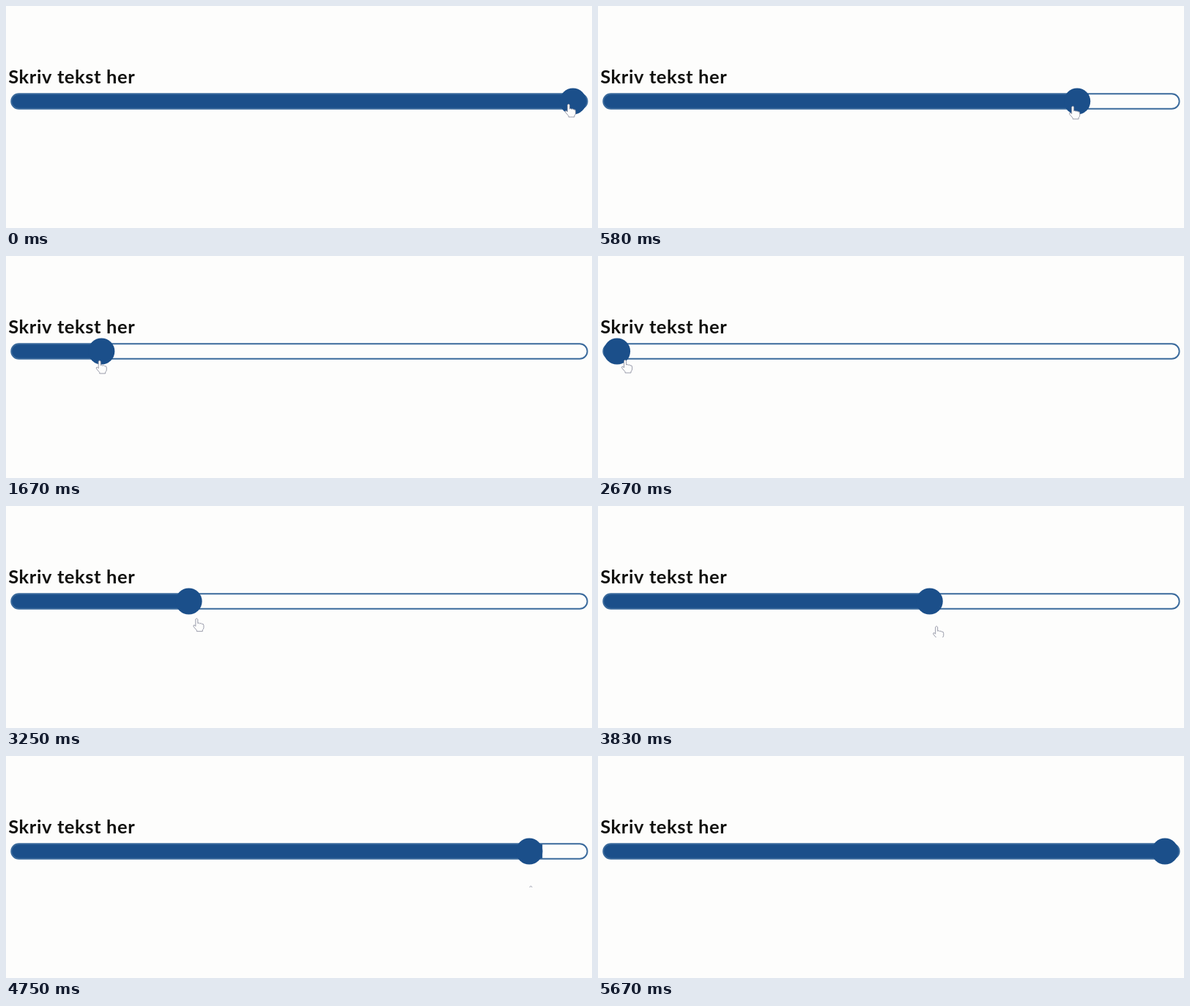
Write an HTML page with a canvas that moves like this. It is 800 by 304 pixels and loops after 6580 ms.

```html
<!DOCTYPE html>
<html lang="da">
<head>
<meta charset="utf-8">
<title>Slider</title>
<style>
  html, body { margin: 0; width: 100%; height: 100%; overflow: hidden; background: #fdfdfc; }
  canvas { display: block; width: 800px; height: 304px; }
</style>
</head>
<body>
<canvas id="stage" width="800" height="304"></canvas>
<script>
const ctx = document.getElementById('stage').getContext('2d');
const LOOP = 6580, FPS = 12;
const PAPER = '#fdfdfc', BLUE = '#1b4f8a', EDGE = '#3a6a9c', INK = '#10100e';
const TRACK = { left: 7.2, right: 793.6, top: 120.2, bottom: 140.8 };
const KNOB = { min: 26, max: 774, y: 130.5, r: 18.1 };
const DRAG_LEFT = { start: 40, end: 2170 };
const DRAG_RIGHT = { start: 2670, end: 5097 };
const CURSOR_FLOOR = 180; // the pointer leaves the recorded area below this line

const mix = (a, b, p) => a + (b - a) * p;
const smooth = u => u * u * (3 - 2 * u);
const easeOut = u => 1 - (1 - u) ** 1.3;
const progress = (t, { start, end }) =>
  Math.min(1, Math.max(0, (t - start) / (end - start)));

const frameStart = n => Math.round(n * 100 / FPS) * 10;

function holdFrame(t) {
  const n = Math.floor(t * FPS / 1000) + 1;
  return frameStart(frameStart(n) > t ? n - 1 : n);
}

// The fingertip trails the knob a little differently on each drag.
function poseAt(t) {
  if (t < DRAG_RIGHT.start) {
    const u = progress(t, DRAG_LEFT), p = smooth(u);
    const knobX = mix(KNOB.max, KNOB.min, p);
    return { knobX, tipX: knobX - 6 + 17 * u ** 6, tipY: 134 + 9 * Math.sin(2 * p) };
  }
  const u = progress(t, DRAG_RIGHT), p = easeOut(u);
  const knobX = mix(KNOB.min, KNOB.max, p);
  return { knobX, tipX: knobX + 11 - 14 * u ** 3, tipY: 142 + 39 * p };
}

function trackPath() {
  const { left, right, top, bottom } = TRACK;
  ctx.beginPath();
  ctx.roundRect(left, top, right - left, bottom - top, (bottom - top) / 2);
}

function drawSlider(x) {
  ctx.save();
  trackPath();
  ctx.clip();
  ctx.fillStyle = BLUE;
  // The fill runs past the knob's centre, so it reaches the rounded end at full value.
  const reach = mix(0, 26, (x - KNOB.min) / (KNOB.max - KNOB.min));
  ctx.fillRect(0, TRACK.top, x + reach - 6, TRACK.bottom - TRACK.top);
  ctx.restore();

  trackPath();
  ctx.strokeStyle = EDGE;
  ctx.lineWidth = 1.9;
  ctx.stroke();

  ctx.fillStyle = BLUE;
  ctx.beginPath();
  ctx.arc(x, KNOB.y, KNOB.r, 0, Math.PI * 2);
  ctx.fill();
}

const hand = new Path2D(
  'M-1.5 1.5 Q0 -1 1.5 1.5 V7 Q3.2 5.6 4.2 7.4 Q6 6 7 8 Q9.4 7 9.6 10' +
  ' V13 Q9.4 15 8 16 V18 H0 V16.5 L-4.3 11.5 Q-5 9 -3 9.4 L-1.5 11 Z');

function drawHand(x, y) {
  ctx.save();
  ctx.beginPath();
  ctx.rect(0, 0, 800, CURSOR_FLOOR);
  ctx.clip();
  ctx.translate(x, y);
  ctx.fillStyle = PAPER;
  ctx.fill(hand);
  ctx.strokeStyle = '#8f92a2';
  ctx.lineWidth = 0.9;
  ctx.stroke(hand);
  ctx.restore();
}

function draw(now) {
  const { knobX, tipX, tipY } = poseAt(holdFrame(now % LOOP));
  ctx.fillStyle = PAPER;
  ctx.fillRect(0, 0, 800, 304);
  ctx.fillStyle = INK;
  ctx.font = '700 25.5px Lato, sans-serif';
  ctx.letterSpacing = '0.6px';
  ctx.fillText('Skriv tekst her', 3.2, 105.8);
  drawSlider(knobX);
  drawHand(tipX, tipY);
}

const start = performance.now();
function tick() {
  draw(performance.now() - start);
  requestAnimationFrame(tick);
}
tick();
</script>
</body>
</html>
```
